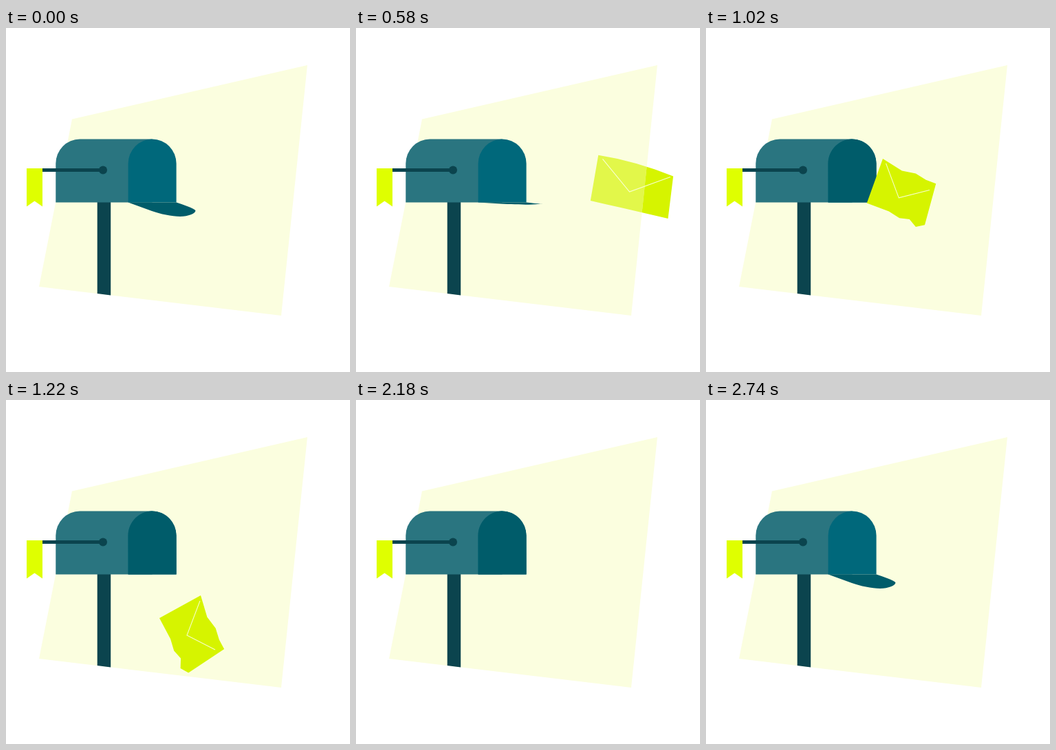
An HTML page that plays this animation: 500 by 500 pixels, repeating every 4.82 s.

```html
<!DOCTYPE html>
<html lang="en">
<head>
<meta charset="utf-8">
<title>Mailbox</title>
<style>
  html, body { margin: 0; width: 100%; height: 100%; overflow: hidden; background: #fff; }
  svg { display: block; width: 100%; height: 100%; }
  .dark { fill: #0b444e; }
</style>
</head>
<body>
<svg viewBox="0 0 500 500">
  <defs>
    <path id="ground" d="M96 132.5 438 54 400 418 48 376Z"/>
    <clipPath id="inside"><use href="#ground"/></clipPath>
    <g id="envelope">
      <path id="paper" fill="#d6f400"/>
      <path id="flap" fill="none" stroke="#f8ffd0"/>
    </g>
  </defs>

  <use id="outer" href="#envelope"/>
  <use href="#ground" fill="#fbfedf"/>

  <path class="dark" d="M132.7 253H152.2V388.5L132.7 386Z"/>
  <path fill="#2a7580" d="M72.3 253.5V197a35 35.5 0 0 1 35-35.5H212.5V253.5Z"/>
  <path fill="#00687b" d="M177.6 253.5V197a35 35.5 0 0 1 70 0V253.5Z"/>
  <path id="lid" fill="#005c6a"/>
  <path class="dark" d="M53 204H141V209H53Z"/>
  <circle class="dark" cx="141" cy="206.5" r="6"/>
  <path fill="#dfff00" d="M30 204H53V259.5L41.5 251.5 30 259.5Z"/>

  <g clip-path="url(#inside)"><use id="inner" href="#envelope"/></g>
</svg>
<script>
const LOOP = 4820, STEP = 20;
const HIT = 830, FALL = 890;

const [lid, paper, flap, envelope, outer, inner] =
  ['lid', 'paper', 'flap', 'envelope', 'outer', 'inner'].map(id => document.getElementById(id));

const span = (t, from, to) => Math.min(1, Math.max(0, (t - from) / (to - from)));
const mix = (a, b, k) => a + (b - a) * k;
const mixAll = (a, b, k) => a.map((v, i) => mix(v, b[i], k));
const easeInOut = u => u < .5 ? .5 * (2 * u) ** 3.3 : 1 - .5 * (2 - 2 * u) ** 3.3;
const range = (n, make) => Array.from({ length: n + 1 }, (_, i) => make(i / n, i));

// Lid shoulder, crown and tip, each as a point and its curve handle: x, y, dx, dy.
const R = 35, K = R * .55;
const LID_OPEN = [[212, 266, 12, 4.3], [253, 274, 12, 0], [275.5, 265.5, 0, -4]];
const LID_SHUT = [[212.5 - R, 197, 0, -K], [212.5, 161.5, K, 0], [212.5 + R, 197, 0, K]];

function drawLid(t) {
  const shut = easeInOut(span(t, 440, 840)) - easeInOut(span(t, 2160, 2740));
  const [a, b, c] = LID_OPEN.map((point, i) => mixAll(point, LID_SHUT[i], shut));
  const curve = (p, q) =>
    `C${[p[0] + p[2], p[1] + p[3], q[0] - q[2], q[1] - q[3], q[0], q[1]]}`;
  const bend = mixAll([274, 262], [247.6, 225], shut);
  lid.setAttribute('d',
    `M177.6 253.5L${a[0]} ${a[1]}${curve(a, b)}${curve(b, c)}Q${bend} 247.6 253.5Z`);
}

// The bowed top and straight bottom turn into zigzags as the paper crumples.
function outline(crumple) {
  const fold = (u, i) => i % 2 ? 0 : u;
  const top = range(4, (u, i) => [
    mix(113 * u - 3.7, 85 * u ** .7 - 1, crumple),
    mix(5.5 * u - 13.6 * u * (1 - u) - 67, -62 - 6.5 * fold(1 - u, i), crumple)
  ]);
  const bottom = range(5, (u, i) => [
    mix(115.7 * u, 90 * u ** .6, crumple),
    9 * fold(u, i) * crumple
  ]);
  return [...top, ...bottom.reverse()];
}

function flight(t) {
  const d = t - 820;
  const x = 310.3 - .25 * d + .00056 * d * d;
  return { x, y: 217.5 + (x - 310.3) * .161, angle: 4.5 + (x - 310.3) * .092 };
}

function pose(t) {
  const p = flight(Math.min(t, FALL));
  const u = Math.max(0, (t - FALL) / 330);
  return {
    x: mix(p.x, 271, u),
    y: mix(p.y, 341.3, u ** 1.7),
    angle: mix(p.angle, 62, u ** 1.3)
  };
}

function drawEnvelope(t) {
  const alpha = span(t, 440, 650) - span(t, 1230, 1370);
  // Off the pale ground the fade is a hard cut.
  inner.setAttribute('opacity', alpha);
  outer.setAttribute('opacity', alpha >= .5 ? 1 : 0);

  const crumple = span(t, HIT, FALL);
  const { x, y, angle } = pose(t);
  const center = mixAll([56, -32], [44, -31], crumple);
  const crease = mixAll([3.6, -63, 52.4, -25.3, 105.5, -59.6],
    [5.6, -63.8, 40.8, -23.6, 78.6, -50], crumple);
  paper.setAttribute('d', `M${outline(crumple)}Z`);
  flap.setAttribute('d', `M${crease}`);
  envelope.setAttribute('transform',
    `translate(${x} ${y}) rotate(${angle}) translate(${-center[0]} ${-center[1]})`);
}

const start = performance.now();
function draw() {
  const elapsed = (performance.now() - start) % LOOP;
  const t = Math.floor(elapsed / STEP) * STEP;
  drawLid(t);
  drawEnvelope(t);
  requestAnimationFrame(draw);
}
draw();
</script>
</body>
</html>
```
